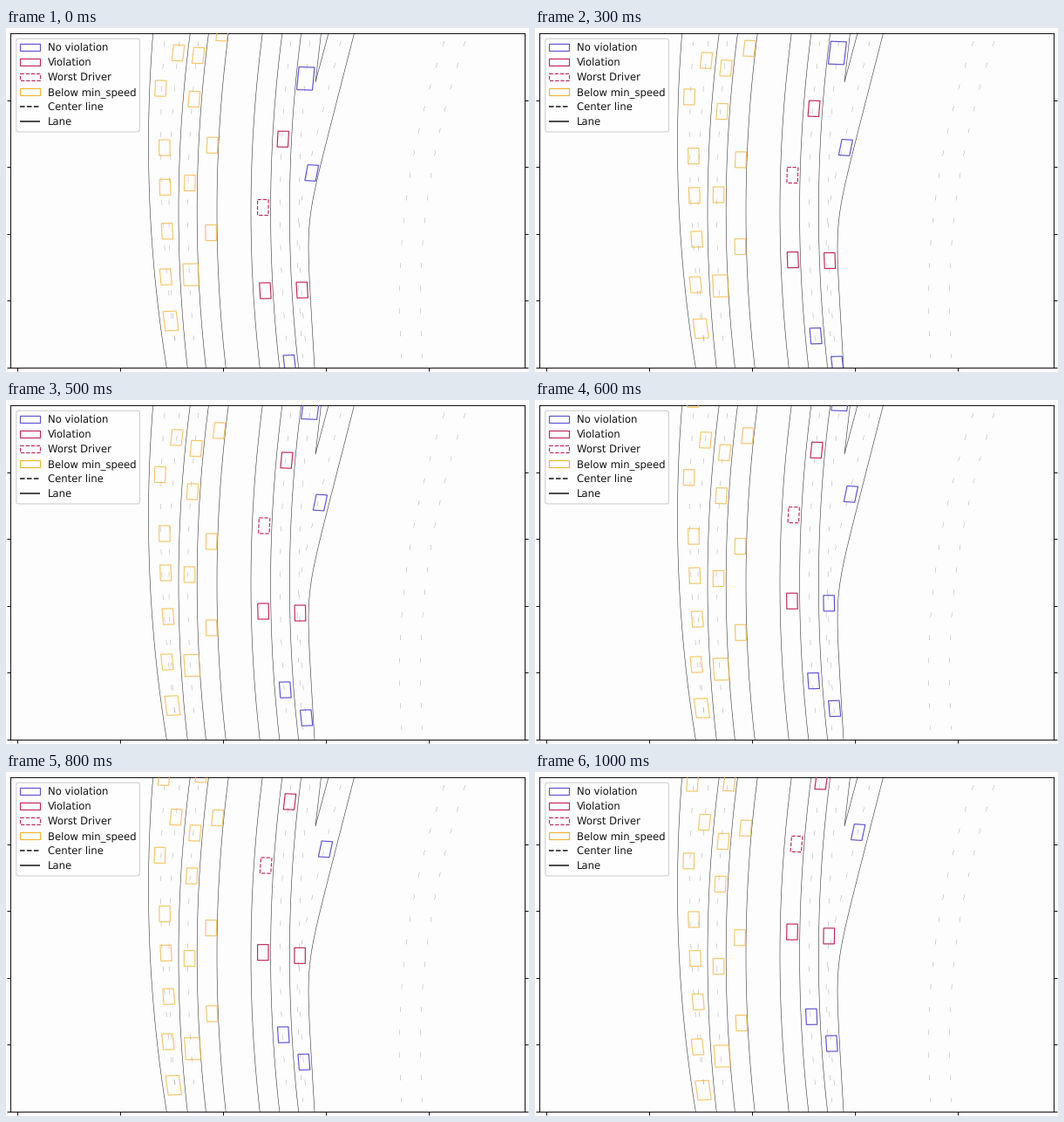
Animation of 600 by 394 pixels, one loop 1100 ms. Source, as a matplotlib script:

```python
import matplotlib.pyplot as plt
import numpy as np
from matplotlib.animation import FuncAnimation
from matplotlib.patches import FancyBboxPatch, Polygon, Rectangle

W, H, DPI = 600, 394, 100
PX = 72 / DPI  # points per pixel
FRAMES, STEP_MS = 11, 100
LEFT, RIGHT, TOP, BOTTOM = 5, 595, 6, 389

BLUE, RED, AMBER = "#5a53d2", "#c22657", "#f2b433"
EDGE = 1.16 * PX
DASH = (0, (3.7, 1.6))
CAR_LENGTH, CAR_ASPECT = 18, 0.69
GORE = [(361.5, 6), (355, 62), (370, 6)]

plt.rcParams["text.hinting"] = "none"


def bend(x0, y0=210, curve=3.19e-4):
    """Road line as a parabola with its leftmost point at (x0, y0)."""
    return lambda y: x0 + curve * (y - y0) ** 2


def shift(path, dx):
    return lambda y: path(y) + dx


def blend(a, b, share):
    return lambda y: a(y) + share * (b(y) - a(y))


def ramp(y):
    """Straight exit lane easing into the main road."""
    return 354 + 0.06 * (y - BOTTOM) + 0.317 * 20 * np.log1p(np.exp((222 - y) / 20))


# Lane borders, left to right
shoulder = bend(163.5, 133.5)
slow_1, slow_2, slow_3, fast_1, fast_2, fast_3 = map(
    bend, (198, 219.2, 242, 281, 303.6, 325.4))
borders = [shoulder, slow_1, slow_2, slow_3, fast_1, fast_2, fast_3, ramp]

side_road = bend(451.5, 313, 5.8e-4)
centers = [shift(shoulder, 14), shift(slow_1, -11), blend(slow_1, slow_2, 0.5),
           blend(fast_2, fast_3, 0.5), shift(fast_3, 11), shift(ramp, -13),
           side_road, shift(side_road, 24)]

# Path, speed in pixels per step, colour, heights halfway through the loop
TRAFFIC = [
    (shift(shoulder, 12.5), 3.12, AMBER, [-4, 85.5, 300, 350]),
    (shift(shoulder, 18.3), 3.12, AMBER, [153, 198, 248]),
    (shift(slow_1, -11), 2.7, AMBER, [43]),
    (shift(slow_1, 12.5), 4.5, AMBER, [-12, 55.5, 105, 200, 304]),
    (shift(slow_2, 15.7), 5.45, AMBER, [35, 162, 261]),
    (shift(fast_1, 13.8), -12, RED, [144, 242]),
    (shift(fast_2, 12), -11, RED, [69]),
    (shift(fast_2, 12), -11, BLUE, [332]),
    (shift(fast_3, 11.7), -11.45, RED, [244]),
    (shift(fast_3, 11.7), -11.45, BLUE, [364]),
    (shift(fast_3, 11), -9, BLUE, [9]),
    (blend(fast_3, ramp, 0.755), -9.35, BLUE, [117.5]),
]
VANS = {304: 25, 350: 22, 9: 26}  # lengths of the larger vehicles
WORST, CALMED = 144, 244
CALM_STEP = 6


class Car:
    def __init__(self, path, speed, color, mid):
        self.path, self.color, self.mid = path, color, mid
        # all traffic runs a little faster towards the top
        self.speed = speed * (1 - 0.00045 * (mid - 200))
        self.length = VANS.get(mid, CAR_LENGTH)
        self.box = ax.add_patch(Polygon(
            [(0, 0)] * 4, fill=False, ec=color, lw=EDGE, zorder=3,
            ls=DASH if mid == WORST else "-", alpha=0.75 if color == AMBER else 1))

    def move(self, k):
        y = self.mid + self.speed * (k - (FRAMES - 1) / 2)
        center = np.array([self.path(y), y])
        lean = (self.path(y + 1) - self.path(y - 1)) / 2
        along = np.array([lean, 1]) * self.length / 2
        across = np.array([1, -0.3 * lean]) * self.length * CAR_ASPECT / 2
        self.box.set_xy([center - across - along, center + across - along,
                         center + across + along, center - across + along])
        if self.mid == CALMED:
            self.box.set_edgecolor(BLUE if k == CALM_STEP else self.color)


def draw_road():
    ys = np.linspace(TOP, BOTTOM, 120)
    for path in borders:
        ax.plot(path(ys), ys, color="#3a3a3a", lw=0.6 * PX)
    ax.plot(*zip(*GORE), color="#3a3a3a", lw=0.6 * PX)
    ys = np.linspace(15, 378, 100)
    for path in centers:
        ax.plot(path(ys), ys, color="#999999", lw=0.4 * PX, ls=(0, (15, 50)))


def draw_legend():
    ax.add_patch(FancyBboxPatch(
        (11.8, 12.3), 141.6, 106.6, boxstyle="round,pad=0,rounding_size=2.3",
        fc=(1, 1, 1, 0.8), ec="#d2d2d2", lw=EDGE, zorder=5))
    rows = [("No violation", BLUE, "-"), ("Violation", RED, "-"),
            ("Worst Driver", RED, DASH), ("Below min_speed", AMBER, "-"),
            ("Center line", None, DASH), ("Lane", None, "-")]
    for i, (label, color, style) in enumerate(rows):
        y = 21.8 + 17.05 * i
        if color:
            ax.add_patch(Rectangle((16, y - 4), 23, 8, fill=False, ec=color,
                                   lw=EDGE, ls=style, zorder=6))
        else:
            ax.plot([16, 39], [y, y], color="#111111", lw=1.5 * PX, ls=style,
                    solid_capstyle="butt", zorder=6)
        ax.text(47.5, y + 4.2, label, fontsize=11.6 * PX, family="DejaVu Sans",
                color="#111111", va="baseline", zorder=6)


fig = plt.figure(figsize=(W / DPI, H / DPI), dpi=DPI, facecolor="white")
ax = fig.add_axes([LEFT / W, 1 - BOTTOM / H, (RIGHT - LEFT) / W, (BOTTOM - TOP) / H],
                  facecolor="#fdfdfe")
ax.set(xlim=(LEFT, RIGHT), ylim=(BOTTOM, TOP),
       xticks=13 + 118 * np.arange(5), yticks=82.6 + 76.5 * np.arange(5))
ax.tick_params(length=4 * PX, width=0.93 * PX, right=True,
               labelbottom=False, labelleft=False)
for spine in ax.spines.values():
    spine.set_linewidth(0.93 * PX)

draw_road()
draw_legend()
cars = [Car(path, speed, color, mid)
        for path, speed, color, mids in TRAFFIC for mid in mids]


def update(k):
    for car in cars:
        car.move(k)
    return [car.box for car in cars]


anim = FuncAnimation(fig, update, frames=FRAMES, init_func=lambda: update(0),
                     interval=STEP_MS, repeat=True, repeat_delay=0, blit=False)
plt.show()
```
